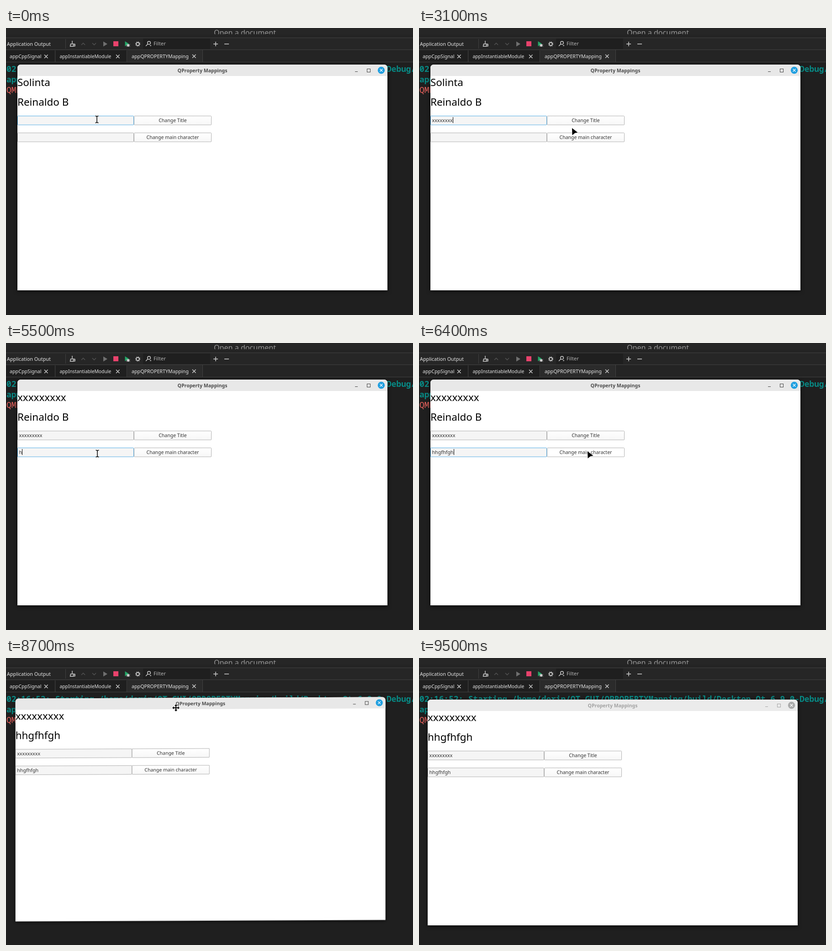
These frames come from a looping animation (891x628 px, 9700 ms). An HTML page:

```html
<!DOCTYPE html>
<html lang="en">
<head>
<meta charset="utf-8">
<title>QProperty Mappings</title>
<style>
  html, body { margin: 0; width: 100%; height: 100%; overflow: hidden; background: #1f1f1f; }
  svg { display: block; }
  text { font: 10.7px "Noto Sans", sans-serif; fill: #e6e6e6; white-space: pre; }
  .log { font: bold 17.8px "Noto Sans Mono", monospace; fill: #078a85; }
  .log.error { font-weight: 400; fill: #ee625d; }
  .heading { font-size: 22.4px; fill: #000; }
  .widget { font-size: 10.5px; fill: #333; }
  .typed { font-size: 10.7px; fill: #333; }
  .caption { font-size: 10.55px; font-weight: bold; fill: #4a4a4a; }
  .middle { text-anchor: middle; }
  .crisp { shape-rendering: crispEdges; }
  .line { fill: none; stroke: #d4d4d4; stroke-width: 1.4; }
  .dim { stroke: #555; }
  .frame { filter: drop-shadow(0 2px 4px rgba(0, 0, 0, .65)); }
  .bar { fill: #e8e8e8; }
  .control { fill: none; stroke: #444; }
  .close { fill: #1f9fe0; }
  .inactive .bar { fill: #ebebeb; }
  .inactive .caption { fill: #a2a2a2; }
  .inactive .control { stroke: #a5a5a5; }
  .inactive .close { fill: #aaa; }
  .field { fill: #f5f5f5; stroke: #b2b2b2; }
  .focus .field { stroke: #58aee5; }
  .button { fill: url(#face); stroke: #b2b2b2; }
  .hover .button { fill: #fff; }
  .pressed .button { fill: #dedede; }
</style>
</head>
<body>
<svg width="891" height="628" viewBox="0 0 891 628">
  <defs>
    <linearGradient id="face" x2="0" y2="1">
      <stop stop-color="#fff"/><stop offset="1" stop-color="#f7f7f7"/>
    </linearGradient>
    <clipPath id="cut"><path d="M0 0H891V13.5H0Z"/></clipPath>
  </defs>

  <!-- editor behind the window -->
  <g class="crisp">
    <path fill="#1f1f1f" d="M0 0H891V628H0Z"/>
    <path fill="#262626" d="M0 0H891V14H0ZM0 22H891V47H0Z"/>
    <path fill="#242424" d="M0 14H891V21H0ZM0 48H891V74H0Z"/>
    <path fill="#1f1f1f" d="M300 23H447V46H300ZM0 49H107V74H0ZM109 49H264V74H109Z"/>
    <path fill="#2b2b2b" d="M266 48H430V74H266Z"/>
    <path fill="#414141" d="M0 21H891V22H0ZM0 47H891V48H0ZM0 74H891V75H0ZM130 24H131V45H130ZM107 49H108V74H107ZM264 49H265V74H264ZM430 48H431V74H430Z"/>
    <path fill="#e8426c" d="M235 29H246V40H235Z"/>
  </g>
  <text x="455" y="16" style="font-size:16.1px;fill:#969696" clip-path="url(#cut)">Open a document</text>
  <text x="2" y="39" style="font-size:10.8px">Application Output</text>
  <text x="323" y="38" style="font-size:11.3px;fill:#b5b5b5">Filter</text>
  <text x="8" y="66">appCppSignal</text>
  <text x="117.5" y="66" style="font-size:10.3px">appInstantiableModule</text>
  <text x="275" y="65.5">appQPROPERTYMapping</text>
  <g class="line">
    <path d="M84 58.500l7.500 7.500m0-7.500l-7.500 7.500M241 58.500l7.500 7.500m0-7.500l-7.500 7.500M408 58l7.500 7.500m0-7.500l-7.500 7.500"/>
    <path d="M454 35h10M459 30v10M478 35h10"/>
    <path d="M145 28v6M141.500 35h7l-1 5h-7zM148 35.500h3v4h-3"/>
    <path class="dim" d="M165 37l4-4 4 4M189 33l4 4 4-4"/>
    <circle cx="288.500" cy="35" r="3.200"/>
    <circle cx="288.500" cy="35" r="4.700" stroke-dasharray="1.850 1.850"/>
    <circle cx="313" cy="32.500" r="3.300"/>
    <path d="M310.500 35L306 39.500M315 38.500h3"/>
  </g>
  <path fill="#707070" d="M213 29.500L222 35 213 40.500Z"/>
  <path fill="#23a566" d="M260.500 29L269 34.500 260.500 40Z"/>
  <ellipse cx="267.500" cy="38" rx="2.200" ry="3" fill="#d4d4d4"/>
  <path class="line" style="stroke-width:.8" d="M263.500 35.500l8 5m0-5l-8 5M263.500 38h8"/>
  <text class="log" x="1" y="96">02:16:52: Starting /home/dorin/QT_GUI/QPROPERTYMapping/build/Desktop_Qt_6_9_0-Debug/</text>
  <text class="log" x="1" y="119">appQPROPERTYMapping...</text>
  <text class="log error" x="1" y="141.500">QML debugging is enabled.</text>

  <g id="window">
    <path class="frame" fill="#fff" d="M25 574V88Q25 80 33 80H827Q835 80 835 88V574Z"/>
    <path class="bar" d="M25 105V88Q25 80 33 80H827Q835 80 835 88V105Z"/>
    <text class="caption middle" x="430" y="96.500">QProperty Mappings</text>
    <path class="control crisp" d="M764 95.500H770M790.500 89.500H797.500V96.500H790.500Z"/>
    <circle class="close" cx="821.500" cy="92.500" r="7.700"/>
    <path d="M818.500 89.500l6 6m0-6l-6 6" stroke="#fff" stroke-width="1.200"/>
    <text class="heading" id="title" x="25" y="127"></text>
    <text class="heading" id="hero" x="25" y="170"></text>
    <g id="rows"></g>
  </g>

  <g id="cursor">
    <path id="beam" d="M-3.500-7.500Q0-7.500 0-5.500V5.500Q0 7.500-3.500 7.500M3.500-7.500Q0-7.500 0-5.500V5.500Q0 7.500 3.500 7.500" fill="none" stroke="#000" stroke-width="1.500"/>
    <path id="arrow" d="M0 0L12.500 9.800 6.500 10.800 .5 15.500Z" stroke="#fff" stroke-width="1.600" stroke-linejoin="round" paint-order="stroke"/>
    <path id="move" d="M0-8l3.200 3.700H1V-1H4.300V-3.200L8 0 4.300 3.200V1H1V4.300H3.200L0 8-3.200 4.300H-1V1H-4.300V3.200L-8 0-4.300-3.200V-1H-1V-4.300H-3.200Z" stroke="#fff" stroke-width="1.400" paint-order="stroke"/>
  </g>
</svg>
<script>
const LOOP = 9700, STEP = 100;
const byId = id => document.getElementById(id);

// time, x, y, shape held from that time on
const cursorTrack = [
  [0, 199, 200, 'beam'], [900, 199, 200, 'beam'], [1200, 199, 202, 'beam'],
  [2500, 199, 202, 'beam'], [2600, 215, 206, 'beam'], [2700, 250, 216, 'arrow'],
  [2900, 305, 226, 'arrow'], [3100, 335, 219, 'arrow'], [3300, 364, 209, 'arrow'],
  [3500, 379, 205, 'arrow'], [3700, 379, 205, 'arrow'], [3800, 376, 207, 'arrow'],
  [4200, 291, 232, 'arrow'], [4400, 235, 238, 'beam'], [4600, 200, 242, 'beam'],
  [5600, 200, 242, 'beam'], [5800, 235, 252, 'arrow'], [6000, 300, 261, 'arrow'],
  [6400, 369, 237, 'arrow'], [6600, 369, 237, 'arrow'], [7100, 377, 259, 'arrow'],
  [7700, 377, 259, 'arrow'], [7800, 376, 257, 'arrow'], [8300, 378, 98, 'arrow'],
  [8400, 378, 98, 'move'], [8700, 372, 109, 'move'], [8800, 372, 109, 'arrow'],
  [9200, 392, -20, 'arrow']
];

// time, shift x, shift y, vertical squeeze, slant
const windowTrack = [
  [0, 0, 0, 0, 0], [8400, 0, 0, 0, 0], [8500, -1, 3, .005, -.002],
  [8600, -2.5, 6, .011, -.003], [8700, -4.3, 8.7, .0125, -.004],
  [8800, -5.4, 10.4, .007, -.002], [8900, -6, 11, .002, 0], [9000, -6, 11, 0, 0]
];

function sample(track, t) {
  let i = track.findLastIndex(row => row[0] <= t);
  const a = track[i], b = track[i + 1] || a;
  const k = b === a ? 0 : (t - a[0]) / (b[0] - a[0]);
  return a.map((v, n) => typeof v === 'number' ? v + (b[n] - v) * k : v).slice(1);
}

const between = (t, from, to) => t >= from && t < to;

function makeRow(y, label, spec) {
  const group = document.createElementNS('http://www.w3.org/2000/svg', 'g');
  group.innerHTML = `
    <rect class="field" x="25.500" y="${y + .5}" width="254" height="19.500" rx="1"/>
    <text class="typed" x="28.500" y="${y + 14}"></text>
    <rect class="crisp caret" y="${y + 3}" width="1" height="13"/>
    <rect class="button" x="280.500" y="${y + .5}" width="169" height="19.500" rx="1"/>
    <text class="widget middle" x="365" y="${y + 14}">${label}</text>`;
  byId('rows').append(group);
  return { y, group, text: group.querySelector('.typed'), caret: group.querySelector('.caret'), ...spec };
}

const rows = [
  makeRow(192, 'Change Title', {
    value: 'xxxxxxxxx', keys: [2300, 2600, 2700, 2800, 2900, 2900, 3000, 3100, 3200],
    focus: [0, 3600], press: [3600, 3800],
    caretOn: t => between(t, 600, 1200) || t >= 1800
  }),
  makeRow(229, 'Change main character', {
    value: 'hhgfhfgh', keys: [5500, 5700, 5700, 5800, 5900, 6000, 6100, 6200],
    focus: [4900, 6500], press: [6500, 6700],
    caretOn: () => true
  })
];

function drawRow(row, t, x, y) {
  const focused = between(t, ...row.focus);
  row.text.textContent = row.value.slice(0, row.keys.filter(k => k <= t).length);
  row.caret.setAttribute('x', Math.round(28.6 + row.text.getComputedTextLength()));
  row.caret.style.display = focused && row.caretOn(t) ? '' : 'none';
  row.group.classList.toggle('focus', focused);
  row.group.classList.toggle('pressed', between(t, ...row.press));
  row.group.classList.toggle('hover', x > 280 && x < 450 && y > row.y && y < row.y + 20);
}

function draw(t) {
  const [x, y, shape] = sample(cursorTrack, t);
  byId('cursor').setAttribute('transform', `translate(${x} ${y})`);
  for (const id of ['beam', 'arrow', 'move']) byId(id).style.display = id === shape ? '' : 'none';

  const [dx, dy, squeeze, slant] = sample(windowTrack, t);
  const frame = byId('window');
  frame.setAttribute('transform',
    `translate(${25 + dx} ${80 + dy}) matrix(1 ${slant} 0 ${1 - squeeze} 0 0) translate(-25 -80)`);
  frame.classList.toggle('inactive', t >= 9500);

  byId('title').textContent = t < 3800 ? 'Solinta' : rows[0].value;
  byId('hero').textContent = t < 6700 ? 'Reinaldo B' : rows[1].value;
  rows.forEach(row => drawRow(row, t, x, y));
}

const start = performance.now();
function tick() {
  const t = (performance.now() - start) % LOOP;
  draw(Math.floor(t / STEP) * STEP);
  requestAnimationFrame(tick);
}
tick();
</script>
</body>
</html>
```
